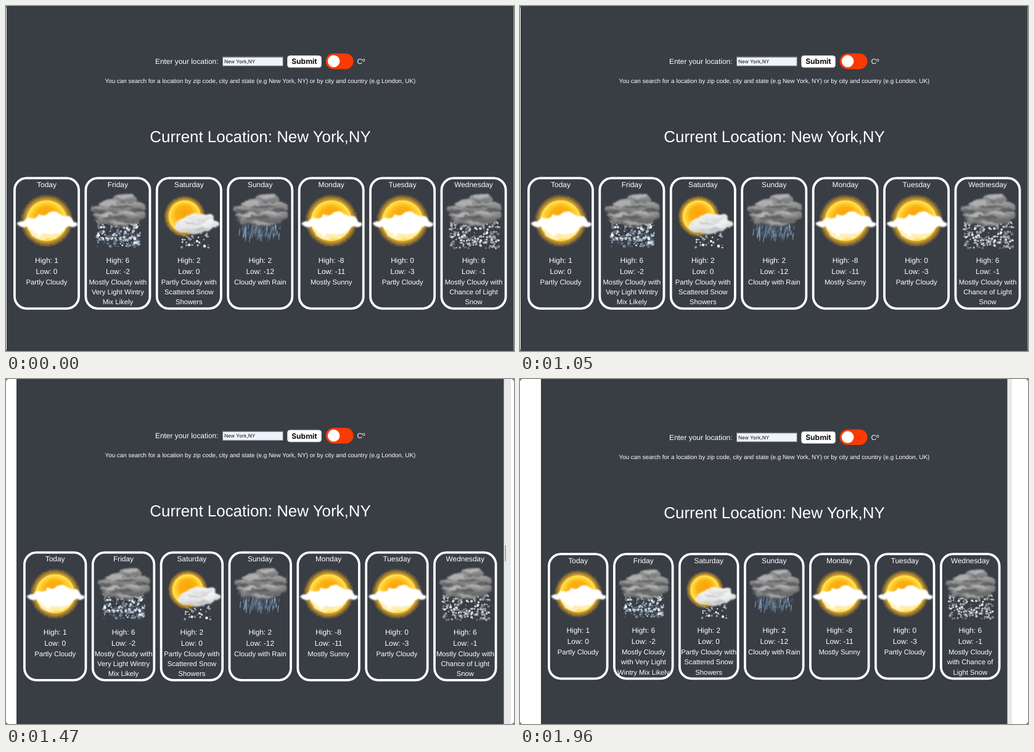
Animation, 824 px wide and 560 px high, one loop 2030 ms. Source, as an HTML page:

```html
<!DOCTYPE html>
<html lang="en">
<head>
<meta charset="utf-8">
<title>Weather forecast</title>
<style>
  html, body { margin: 0; width: 824px; height: 560px; overflow: hidden; background: #fff; }
  svg { display: block; }
  text { fill: #fff; font-family: "Liberation Sans", Arial, sans-serif; text-rendering: geometricPrecision; }
  .ui { fill: #111; font-family: Inter, sans-serif; }
</style>
</head>
<body>
<svg width="824" height="560" viewBox="0 0 824 560">
  <defs>
    <filter id="wisp" x="-20%" y="-20%" width="140%" height="140%" color-interpolation-filters="sRGB">
      <feTurbulence type="fractalNoise" baseFrequency=".06 .1" numOctaves="2" seed="4"/>
      <feDisplacementMap in="SourceGraphic" scale="11" xChannelSelector="R" yChannelSelector="G"/>
      <feGaussianBlur stdDeviation="1"/>
    </filter>
    <filter id="fine" x="-20%" y="-20%" width="140%" height="140%"><feGaussianBlur stdDeviation=".55"/></filter>
    <radialGradient id="glow">
      <stop offset=".7" stop-color="#ffc928"/>
      <stop offset=".82" stop-color="#eeb023" stop-opacity=".65"/>
      <stop offset="1" stop-color="#c98d1c" stop-opacity="0"/>
    </radialGradient>
    <radialGradient id="disc" fy=".35">
      <stop offset="0" stop-color="#f9a50a"/>
      <stop offset=".55" stop-color="#fbb012"/>
      <stop offset=".8" stop-color="#ffcb2c"/>
      <stop offset="1" stop-color="#ffe452"/>
    </radialGradient>
    <linearGradient id="grey" x2="0" y2="1">
      <stop offset="0" stop-color="#a9a9aa"/>
      <stop offset=".5" stop-color="#828283"/>
      <stop offset="1" stop-color="#5c5d5f"/>
    </linearGradient>
    <linearGradient id="pale" x2="0" y2="1">
      <stop offset="0" stop-color="#fafafa"/>
      <stop offset=".6" stop-color="#dedfe1"/>
      <stop offset="1" stop-color="#c6c8cc"/>
    </linearGradient>
    <g id="icons"></g>
  </defs>
  <g id="scene"></g>
</svg>
<script>
const LOOP = 2030, STEP = 70, FULL_CARD = 107.93;
const $ = id => document.getElementById(id);

// Icons are drawn in a 100 x 100 box
let seed = 7;
const rand = (a = 0, b = 1) => {
  seed = (seed * 16807) % 2147483647;
  return a + (b - a) * seed / 2147483647;
};
const many = (n, make) => Array.from({ length: n }, (_, i) => make(i)).join('');
const pick = list => list[Math.floor(rand(0, list.length))];

function sun(cx, cy, r) {
  const rays = many(100, i => {
    const a = i * Math.PI / 50, end = r * rand(1.12, 1.3), c = Math.cos(a), s = Math.sin(a);
    return `M${cx + r * c} ${cy + r * s}L${cx + end * c} ${cy + end * s}`;
  });
  return `<circle cx="${cx}" cy="${cy}" r="${r * 1.32}" fill="url(#glow)"/>
    <path d="${rays}" stroke="#f2b02a" stroke-width=".8" opacity=".4" filter="url(#fine)"/>
    <circle cx="${cx}" cy="${cy}" r="${r - 1}" fill="url(#disc)" stroke="#ffdd55" stroke-width="2" filter="url(#fine)"/>`;
}

const puffs = (fill, list, attrs = '') => `<g fill="${fill}" ${attrs}>` +
  list.map(([x, y, rx, ry]) => `<ellipse cx="${x}" cy="${y}" rx="${rx}" ry="${ry}"/>`).join('') + '</g>';
const cloud = (...layers) => `<g filter="url(#wisp)">${layers.join('')}</g>`;

const flakes = (n, x0, x1, y0, y1, size, colors) => '<g filter="url(#fine)">' + many(n, () =>
  `<circle cx="${rand(x0, x1)}" cy="${rand(y0, y1)}" r="${rand(.9, size)}" fill="${pick(colors)}" opacity="${rand(.5, 1)}"/>`) + '</g>';

const rain = n => '<g filter="url(#fine)" stroke-width="1.7" stroke-linecap="round">' + many(n, () => {
  const x = rand(17, 84), y = rand(50, 72), len = rand(4, 12);
  return `<path d="M${x} ${y}l${-len * .12} ${len}" stroke="${pick(['#4d6580', '#71859c', '#3f5670', '#9aa9ba'])}" opacity="${rand(.4, .9)}"/>`;
}) + '</g>';

const darkCloud = cloud(
  puffs('url(#grey)', [[60, 16, 20, 11], [38, 23, 20, 9], [76, 27, 19, 9], [22, 31, 18, 7], [50, 32, 34, 11],
    [82, 40, 13, 8], [24, 43, 17, 7], [48, 48, 32, 10], [66, 44, 22, 9]]),
  puffs('#c4c4c4', [[34, 20, 13, 3], [62, 10, 13, 3], [64, 35, 16, 2.5], [28, 39, 14, 2.5], [55, 53, 20, 2.5]], 'opacity=".6"'),
  puffs('#4c4d4f', [[56, 26, 20, 3], [82, 31, 10, 2.5], [44, 44, 20, 3], [20, 33, 9, 2]], 'opacity=".6"'));
const whiteCloud = cloud(
  puffs('#fff', [[50, 65, 30, 13]], 'opacity=".6"'),
  puffs('#fff', [[14, 54, 12, 5], [28, 52, 15, 9], [44, 49, 15, 9], [63, 46, 17, 12], [80, 51, 13, 9],
    [90, 55, 8, 4], [46, 60, 27, 11], [68, 61, 14, 9]]));
const paleCloud = cloud(
  puffs('url(#pale)', [[60, 47, 15, 9], [76, 46, 13, 9], [43, 54, 14, 8], [86, 54, 11, 7], [36, 62, 10, 6], [60, 60, 30, 10]]),
  puffs('#b3b5b9', [[58, 53, 16, 2], [70, 63, 14, 2]], 'opacity=".6"'));

const icons = {
  sunny: sun(50, 49, 33) + whiteCloud,
  wintry: flakes(210, 16, 87, 50, 91, 2.7, ['#fff', '#e3e9f0', '#b4c2d1', '#64788f', '#465c75']) + darkCloud,
  scattered: sun(43, 42, 26) + flakes(38, 38, 82, 70, 93, 2.4, ['#fff', '#d5d9de', '#9298a0']) + paleCloud,
  rain: rain(120) + darkCloud,
  snow: flakes(230, 11, 92, 50, 94, 2.4, ['#f2f2f2', '#d0d0d0', '#a3a5a8', '#75787c']) + darkCloud
};
$('icons').innerHTML = Object.entries(icons).map(([id, art]) => `<g id="${id}">${art}</g>`).join('');

// day, icon, high, low, description, description when the card is narrow
const days = [
  ['Today', 'sunny', 1, 0, 'Partly Cloudy'],
  ['Friday', 'wintry', 6, -2, 'Mostly Cloudy with|Very Light Wintry|Mix Likely', 'Mostly Cloudy|with Very Light|Wintry Mix Likely'],
  ['Saturday', 'scattered', 2, 0, 'Partly Cloudy with|Scattered Snow|Showers'],
  ['Sunday', 'rain', 2, -12, 'Cloudy with Rain'],
  ['Monday', 'sunny', -8, -11, 'Mostly Sunny'],
  ['Tuesday', 'sunny', 0, -3, 'Partly Cloudy'],
  ['Wednesday', 'snow', 6, -1, 'Mostly Cloudy with|Chance of Light|Snow', 'Mostly Cloudy|with Chance of|Light Snow']
];

const text = (x, y, size, str, attrs = 'text-anchor="middle"') =>
  `<text x="${x}" y="${y}" font-size="${size}" ${attrs}>${str}</text>`;
const rect = (x, y, w, h, fill, attrs = '') =>
  `<rect x="${x}" y="${y}" width="${w}" height="${h}" fill="${fill}" ${attrs}/>`;

function track(t, keys) {
  let [t0, v0] = keys[0];
  for (const [t1, v1] of keys) {
    if (t <= t1) return t1 > t0 ? v0 + (v1 - v0) * Math.max(0, t - t0) / (t1 - t0) : v1;
    [t0, v0] = [t1, v1];
  }
  return v0;
}

const header = () => text(242, 94, 11.9, 'Enter your location:', '') +
  rect(351.5, 83, 97.5, 14, '#eff3fb', 'stroke="#a9acb2"') +
  '<path d="M351.5 97V83H449" fill="none" stroke="#777a80"/>' +
  text(354, 92.8, 8, 'New York,NY', 'class="ui"') +
  rect(456.5, 80.7, 55, 19, '#fff', 'rx="4" stroke="#c9ced6"') +
  text(484, 94.3, 12, 'Submit', 'class="ui" font-weight="700" text-anchor="middle"') +
  rect(518.7, 77, 44.8, 25.4, '#fa3a05', 'rx="12.7"') +
  '<circle cx="531.6" cy="89.6" r="9.8" fill="#fff"/>' +
  text(569.5, 94, 11.9, 'Cº', '') +
  text(412.4, 124.8, 9.87, 'You can search for a location by zip code, city and state (e.g New York, NY) or by city and country (e.g London, UK)') +
  text(412.5, 221, 25.9, 'Current Location: New York,NY');

function card([day, icon, high, low, wide, narrow], x, w, shift) {
  const mid = x + w / 2;
  const lines = (w < 100 && narrow || wide).split('|');
  return rect(x + 1.9, 279.4 + shift, w - 3.8, 211.7 - 2 * shift, 'none', 'rx="19.5" stroke="#fff" stroke-width="3.8"') +
    text(mid, 294 + shift, 11.9, day) +
    `<use href="#${icon}" transform="translate(${x + 4} ${299.5 + shift}) scale(${(w - 8) / 100})"/>` +
    text(mid, 417.2 - shift, 11.9, 'High: ' + high) +
    text(mid, 434.8 - shift, 11.9, 'Low: ' + low) +
    lines.map((line, i) => text(mid, 452 + 16.2 * i - shift, 11.25, line)).join('');
}

function grip(t, right) {
  if (t < 1400 || t > 1820) return '';
  const x = right + (t < 1540 ? 2 : 4.5);
  return rect(x, 270, 1.5, 26, '#999') + (t < 1540 ? '' : rect(x + 3.5, 270, 1.5, 26, '#999'));
}

const corners = '<path d="M0 0h3L0 3zM824 0v3l-3-3zM0 560v-3l3 3zM824 560h-3l3-3z" fill="#63666b"/>';

function scene(t) {
  const left = track(t, [[1050, 1], [1120, 2], [1260, 7], [1470, 17], [1680, 26], [1820, 30.5], [1960, 34]]);
  const right = 824.5 - left;
  const stripEnd = track(t, [[1260, 824], [1470, 819], [1680, 815], [1960, 798]]);
  const w = (right - left - 67) / 7;
  const shift = (FULL_CARD - w) / 2;
  return rect(0, 0, 824, 560, '#fff') +
    rect(right, 0, stripEnd - right, 560, '#e6e8e9') +
    rect(left, 0, right - left, 560, '#393d44') +
    grip(t, right) + corners +
    `<g transform="translate(0 ${shift})">${header()}</g>` +
    days.map((d, i) => card(d, left + 11 + i * (w + 7.5), w, shift)).join('');
}

const start = performance.now();
let shown = '';
function tick() {
  const t = Math.floor((performance.now() - start) % LOOP / STEP) * STEP;
  const next = scene(t);
  if (next !== shown) $('scene').innerHTML = shown = next;
  requestAnimationFrame(tick);
}
tick();
</script>
</body>
</html>
```
